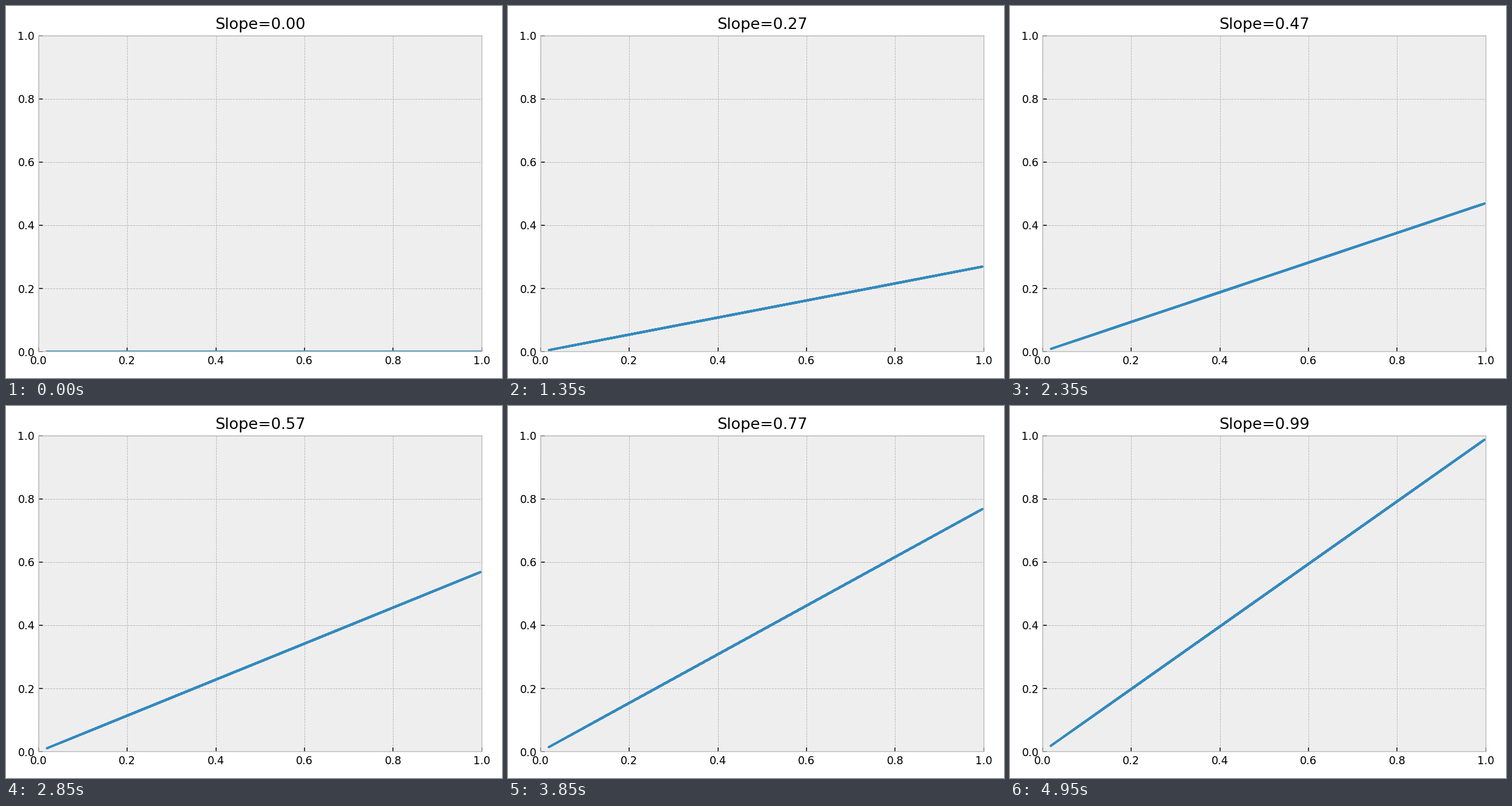
A matplotlib script that plays this animation: 864x648 px, repeating every 5 s.

```python
import numpy as np
import matplotlib.pyplot as plt
from matplotlib.animation import FuncAnimation

FRAMES = 100
X_MIN, X_MAX = 0.0188, 0.9972

plt.style.use("bmh")
plt.rcParams["font.family"] = "DejaVu Sans"

# Unsorted samples: the line runs back and forth along itself.
samples = np.random.default_rng(3).random(100)
x = np.interp(samples, [samples.min(), samples.max()], [X_MIN, X_MAX])

fig, ax = plt.subplots(figsize=(6.4, 4.8), dpi=135)
ax.set_xlim(0, 1)
ax.set_ylim(0, 1)
line, = ax.plot(x, 0 * x, solid_capstyle="round", solid_joinstyle="round")
title = ax.set_title("Slope=0.00")
fig.tight_layout()


def update(frame):
    slope = frame / FRAMES
    line.set_data(x, slope * x)
    title.set_text(f"Slope={slope:.2f}")
    return line, title


anim = FuncAnimation(fig, update, frames=FRAMES, interval=50,
                     repeat=True, repeat_delay=0)
plt.show()
```
